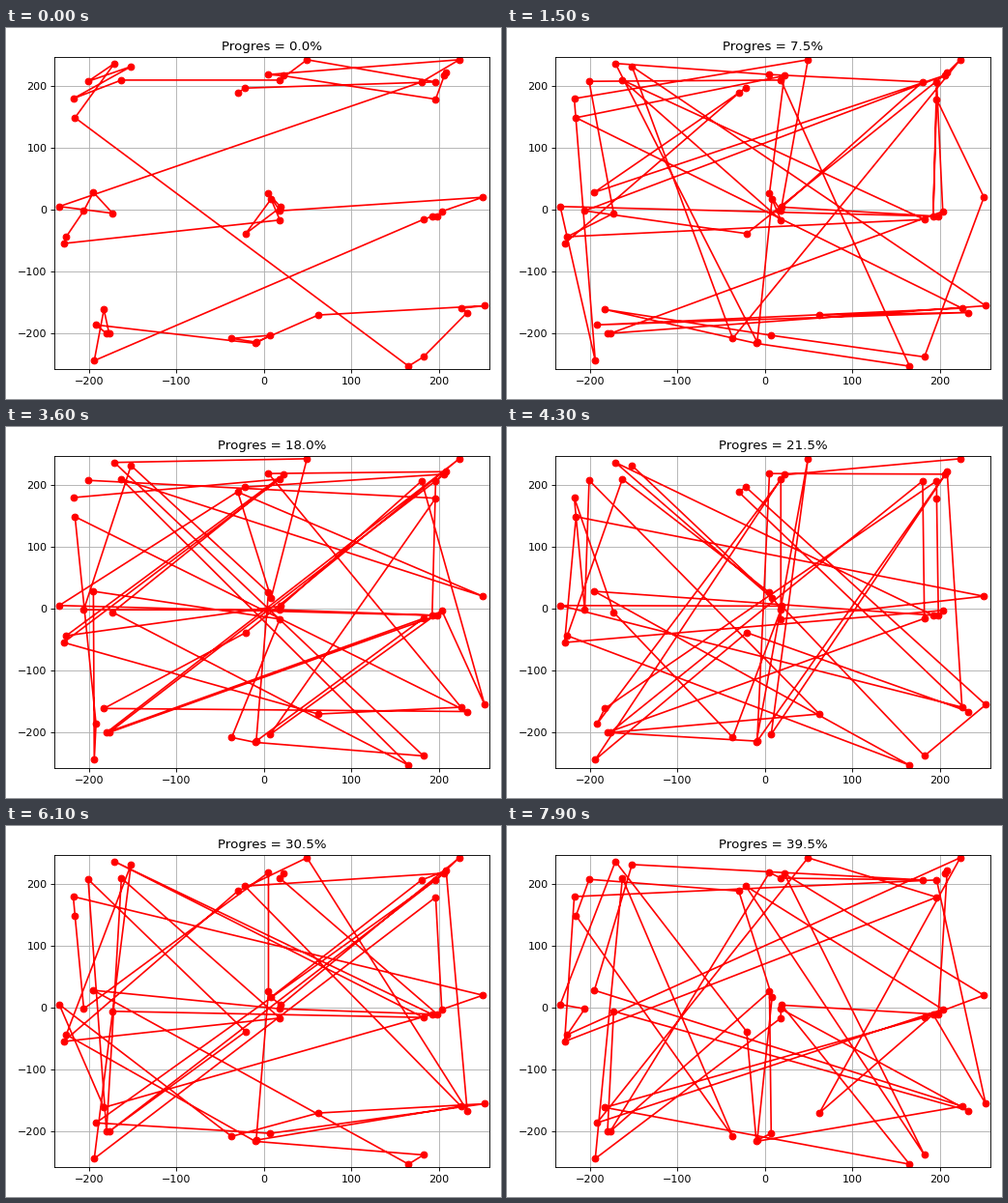
Write a matplotlib script that moves like this. It is 512x384 px and loops after 8 s.

```python
import numpy as np
import matplotlib.pyplot as plt
from matplotlib.animation import FuncAnimation

FRAMES = 80
INTERVAL = 100
STEP = 0.5          # percent of the run per frame
MOVES = 50          # proposed reversals per frame
TEMPERATURE = 600

# Cities in nine loose groups, in the order of the first tour.
cities = np.array([
    (-30, 189), (-22, 197), (196, 207), (49, 243), (18, 210),
    (-163, 210), (-218, 180), (-152, 232), (-201, 208), (-171, 237), (-216, 149),
    (165, -254), (182, -239), (232, -167), (225, -160), (252, -156),
    (62, -171), (-9, -215), (-37, -209), (7, -204), (-10, -217),
    (-192, -187), (-180, -201), (-177, -201), (-183, -162), (-194, -245),
    (182, -16), (192, -11), (198, -11), (203, -3), (250, 20),
    (18, -2), (5, 26), (19, 4), (-21, -39), (8, 17), (18, -17),
    (-229, -55), (-226, -44), (-206, -2), (-195, 28), (-173, -6), (-234, 5),
    (180, 207), (223, 243), (5, 219), (22, 217), (196, 179), (206, 218), (208, 222),
])


def length(tour):
    return np.hypot(*np.diff(cities[tour], axis=0).T).sum()


def anneal(tour, rng):
    """Reverse random stretches, often keeping a longer tour."""
    for _ in range(MOVES):
        a, b = sorted(rng.choice(len(tour) + 1, 2, replace=False))
        trial = tour.copy()
        trial[a:b] = trial[a:b][::-1]
        gain = length(tour) - length(trial)
        if gain >= 0 or rng.random() < np.exp(gain / TEMPERATURE):
            tour = trial
    return tour


rng = np.random.default_rng(4)
tours = [np.arange(len(cities))]
while len(tours) < FRAMES:
    tours.append(anneal(tours[-1], rng))

fig, ax = plt.subplots(figsize=(6.4, 4.8), dpi=80)
path, = ax.plot([], [], "ro-")
title = ax.set_title("Progres = 0.0%")
ax.set(xlim=(-239.3, 257.4), ylim=(-259, 248))
ax.grid(True)
pixel = 1 / 384
fig.tight_layout(rect=(0, pixel, 1, 1 - pixel))


def update(i):
    path.set_data(*cities[tours[i]].T)
    title.set_text(f"Progres = {i * STEP:.1f}%")
    return path, title


anim = FuncAnimation(fig, update, frames=FRAMES, interval=INTERVAL, repeat=True)
plt.show()
```
